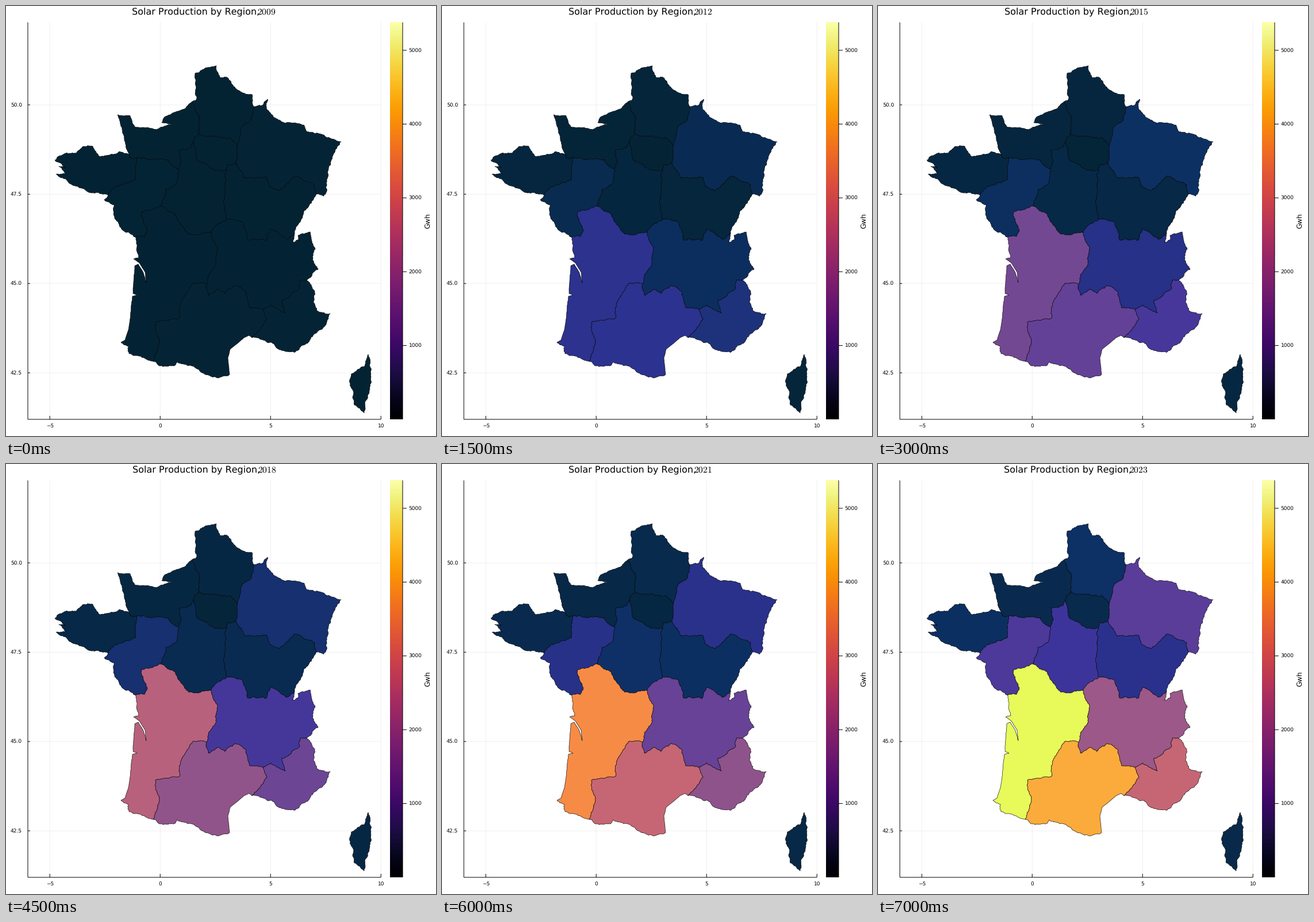
A matplotlib script that plays this animation: 748x748 px, repeating every 7.5 s.

```python
import random

import numpy as np
import matplotlib.pyplot as plt
from matplotlib.animation import FuncAnimation
from matplotlib.colors import LinearSegmentedColormap

SIZE = 748
DPI = 100
PT = 72 / DPI  # points per pixel
YEARS = range(2009, 2024)
TOP_VALUE = 5375

plt.rcParams.update({"font.family": "DejaVu Sans", "text.hinting": "none",
                     "text.hinting_factor": 1, "path.snap": False})
random.seed(11)

# ---------------------------------------------------------------- outlines
# Junctions where borders meet each other or the coast.
NODES = dict(
    a=(214, 258), b=(323, 167), c=(336, 222), d=(326, 237), e=(300, 283),
    f=(228, 264), g=(431, 175), h=(402, 244), i=(400, 273), j=(384, 286),
    k=(540, 327), l=(502, 396), m=(384, 371), n=(357, 394), o=(270, 348),
    p=(225, 402), q=(178, 329), r=(523, 477), s=(448, 527), t=(349, 484),
    u=(428, 577), v=(389, 641), w=(256, 618), x=(200, 585), y=(222, 440),
    z=(630, 606))
edges = {}


def roughen(p, q, rough):
    """Midpoint displacement between p and q, without the end point."""
    dx, dy = q[0] - p[0], q[1] - p[1]
    dist = np.hypot(dx, dy)
    if dist < 3:
        return [p]
    k = rough * random.uniform(-1, 1) / dist ** 0.5
    mid = ((p[0] + q[0]) / 2 - k * dy, (p[1] + q[1]) / 2 + k * dx)
    return roughen(p, mid, rough) + roughen(mid, q, rough)


def edge(ends, *xy, rough=0.42):
    """A ragged line between two junctions through a few key points."""
    first, last = (NODES[e] for e in ends)
    pts = [first, *zip(xy[::2], xy[1::2]), last]
    line = []
    for p, q in zip(pts, pts[1:]):
        line += roughen(p, q, rough)
    edges[ends] = line + [last]


def ring(walk):
    """Outline met on a walk from junction to junction."""
    out = []
    for p, q in zip(walk, walk[1:]):
        out += edges[p + q] if p + q in edges else edges[q + p][::-1]
    return np.array(out)


# coasts and outer borders
edge("ab", 209, 247, 202, 212, 194, 189, 216, 191, 224, 210, 262, 215,
     288, 206, 271, 203, 276, 193, 312, 178, rough=0.25)
edge("bg", 332, 160, 329, 117, 344, 110, 366, 104, 372, 124, 387, 126,
     398, 141, 410, 150, 428, 154)
edge("gk", 447, 172, 455, 162, 453, 178, 478, 200, 518, 207, 525, 219,
     552, 224, 583, 236, 568, 262, 558, 322, 552, 331)
edge("kl", 534, 338, 518, 358, 516, 368, 504, 387)
edge("lr", 498, 411, 509, 407, 508, 399, 529, 393, 531, 405, 538, 423,
     533, 436, 543, 458)
edge("ru", 537, 496, 535, 516, 541, 530, 564, 535, 557, 553, 524, 587,
     503, 602, 478, 598, 464, 587)
edge("uv", 423, 573, 414, 577, 390, 597, 386, 612, rough=0.08)
edge("vw", 367, 647, 345, 640, 329, 629, 298, 619, 292, 626, 267, 626)
edge("wx", 243, 614, 214, 605, 213, 592)
edge("xy", 207, 581, 213, 563, 220, 505, 228, 503, 221, 500, 224, 452,
     230, 449, 239, 464, 244, 481, 242, 463, 232, 447, rough=0.08)
edge("yp", 231, 438, 228, 418)
edge("pq", 203, 390, 189, 368, 188, 346, 171, 337)
edge("qa", 148, 325, 108, 306, 87, 293, 104, 292, 92, 279, 103, 281,
     85, 268, 104, 256, 122, 256, 133, 245, 151, 244, 163, 262, 197, 253)
edge("zz", 635, 640, 633, 665, 623, 708, 606, 694, 598, 655, 601, 640,
     624, 626)

# borders between regions
edge("bc", 336, 190)
edge("cd", 329, 228)
edge("de", 322, 246, 301, 251, 305, 270)
edge("ef", 291, 279, 282, 267, 249, 267)
edge("fa", 216, 264)
edge("gh", 427, 198, 410, 212)
edge("hc", 389, 229)
edge("hi")
edge("ij", 386, 276)
edge("jd", 364, 286, 333, 268)
edge("ki", 537, 311, 502, 296, 475, 321, 458, 313, 453, 298, 416, 299)
edge("lm", 488, 406, 460, 389, 452, 408, 420, 407, 411, 376)
edge("mj", 380, 333)
edge("mn", 369, 379)
edge("no", 318, 397, 303, 378, 293, 361, 279, 354)
edge("oe", 278, 319, 297, 308)
edge("op", 236, 358, 246, 390, 241, 401)
edge("qf", 190, 314, 225, 302)
edge("nt", 368, 420, 365, 450, 352, 468)
edge("tw", 326, 482, 305, 515, 302, 543, 260, 550, 267, 585)
edge("rs", 512, 477, 511, 490, 480, 512, 486, 534, 460, 520)
edge("st", 424, 525, 416, 496, 399, 486, 380, 500, 368, 493, 352, 503)
edge("su", 454, 544, 439, 565)

# ---------------------------------------------------------------- data
# walk around the region: output in 2020 and in 2023, bend of the early rise
REGIONS = {
    "abcdefa": (190, 280, 1), "bghcb": (200, 495, 0.8),
    "chijdc": (110, 260, 1), "gkihg": (685, 1420, 0.65),
    "klmjik": (370, 850, 1.1), "djmnoed": (375, 1075, 1),
    "feopqf": (700, 1270, 0.75), "qafq": (235, 470, 0.65),
    "ontwxypo": (3530, 5375, 1.2), "lrstnml": (1420, 2400, 1),
    "tsuvwt": (2670, 4370, 0.95), "rusr": (2000, 3010, 0.9),
    "zz": (200, 240, 0.65),
}


def output(year, mid, end, bend):
    """Steady growth up to 2020, then a steeper one."""
    pace = np.interp(year, [2010, 2012, 2020, 2021, 2022, 2023],
                     [0.01, 0.31, 1, 1.2, 1.67, 2])
    return mid * min(pace, 1) ** bend + (end - mid) * max(pace - 1, 0)


thermal = LinearSegmentedColormap.from_list("thermal", [
    "#032333", "#0d3064", "#35329b", "#5d3e99", "#7e4d8f", "#9e5987",
    "#c16479", "#e17161", "#f68b45", "#fbad3c", "#f6d346", "#e7fa5a"], N=512)

# ---------------------------------------------------------------- stage
fig = plt.figure(figsize=(SIZE / DPI, SIZE / DPI), dpi=DPI, facecolor="white")
ax = fig.add_axes([0, 0, 1, 1])
ax.axis("off")

LEFT, RIGHT, TOP, BOTTOM = 38, 652, 28.5, 719


def stroke(x0, y0, x1, y1, width=1.0, **kw):
    ax.plot([x0, x1], [y0, y1], color="black", lw=width * PT,
            solid_capstyle="butt", **kw)


def label(x, y, text, size=8.89, **kw):
    return ax.text(x, y, text, fontsize=size * PT, color="black", **kw)


for lon in range(-5, 11, 5):
    x = 268.2 + 38.4 * lon
    stroke(x, TOP, x, BOTTOM, 0.6, alpha=0.1, zorder=0)
    stroke(x, BOTTOM, x, BOTTOM - 6)
    label(x, 730, str(lon).replace("-", "\u2212"), ha="center", va="center")

for lat in np.arange(42.5, 51, 2.5):
    y = 172 + 62.15 * (50 - lat)
    stroke(LEFT, y, RIGHT, y, 0.6, alpha=0.1, zorder=0)
    stroke(LEFT, y, LEFT + 4, y)
    label(28, y, f"{lat:.1f}", ha="right", va="center")

stroke(LEFT, TOP, LEFT, BOTTOM)
stroke(LEFT, BOTTOM, RIGHT, BOTTOM)

# colour bar
ax.imshow(np.linspace(0, 1, 256)[:, None], cmap="inferno", aspect="auto",
          origin="lower", extent=(668, 690, BOTTOM, TOP))
stroke(690, TOP, 690, BOTTOM)
for value in range(1000, 5001, 1000):
    y = BOTTOM - 0.1284 * value
    stroke(690, y, 697, y)
    label(700.5, y, str(value), ha="left", va="center")
label(733.5, 373.5, "Gwh", 12.2, rotation=90, ha="center", va="center")

title = label(219, 15, "Solar Production by Region,", 15.55, va="baseline")
year_text = label(437.5, 15, "", 15.55, va="baseline", math_fontfamily="cm")

patches = {walk: ax.fill(*ring(walk).T, ec="black", lw=0.6 * PT, zorder=3,
                         joinstyle="round")[0]
           for walk in REGIONS}

ax.set_xlim(0, SIZE)
ax.set_ylim(SIZE, 0)


def draw(i):
    year = YEARS[i]
    shift = 0.9 if "1" in str(year) else 0  # the digit 1 is narrower
    title.set_x(219 + shift)
    year_text.set_x(437.5 + shift)
    year_text.set_text(f"${year}$")
    for walk, patch in patches.items():
        patch.set_facecolor(thermal(output(year, *REGIONS[walk]) / TOP_VALUE))
    return [title, year_text, *patches.values()]


anim = FuncAnimation(fig, draw, frames=len(YEARS), interval=500,
                     repeat=True, repeat_delay=0)
plt.show()
```
